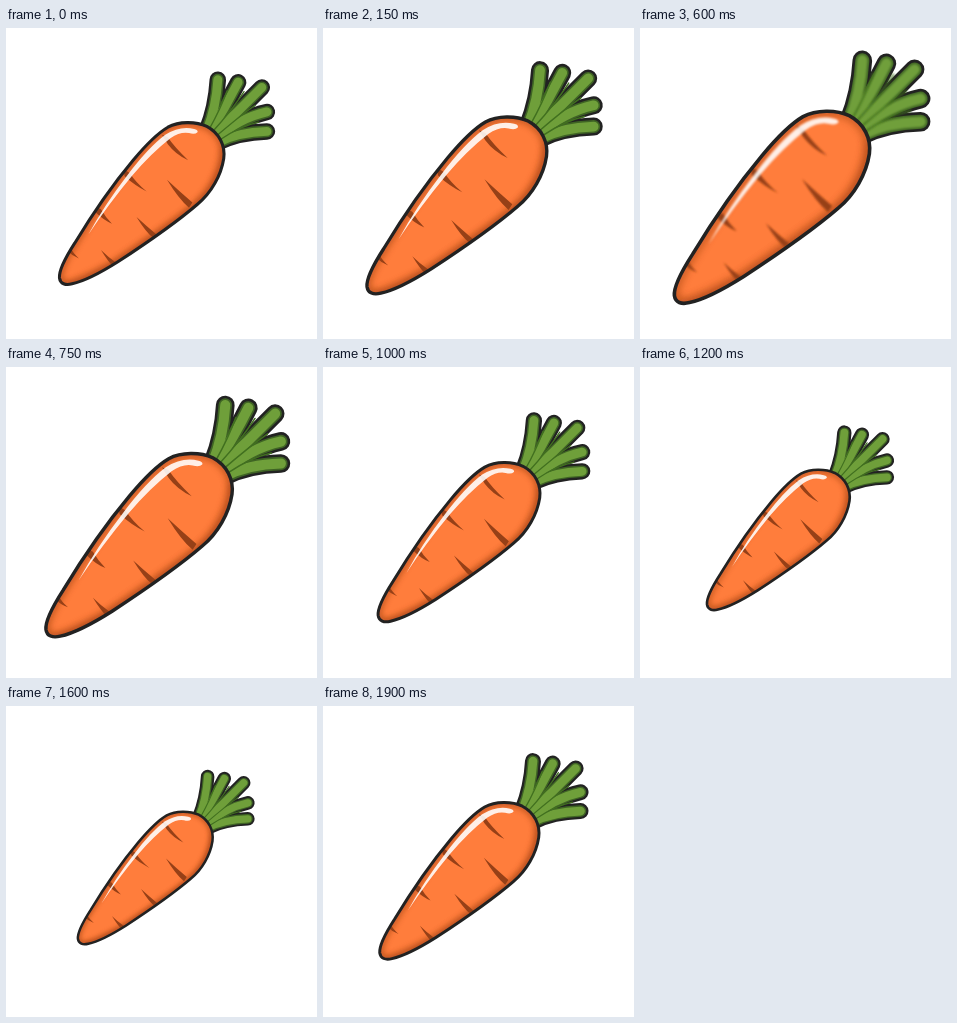
These frames come from a looping animation (311x311 px, 1.95 s). An HTML page:

```html
<!DOCTYPE html>
<html>
<head>
<meta charset="utf-8">
<style>
html, body { margin: 0; width: 100%; height: 100%; overflow: hidden; background: #fff }
svg { display: block; width: 311px; height: 311px }
path { stroke-linecap: round; stroke-linejoin: round }
</style>
</head>
<body>
<svg viewBox="0 0 311 311">
  <defs>
    <path id="body" d="M35 267C34 257 44 240 53 226C73 193 96 159 122 128C137 110 151 96 163 89C176 82 196 82 209 88C224 96 231 111 229 126C226 146 214 167 198 180C176 199 133 229 104 248C85 260 64 271 50 274C42 276 36 274 35 267Z"/>
    <clipPath id="inside"><use href="#body"/></clipPath>
    <g id="leaves" fill="none">
      <path d="M209 93Q220 66 222 33"/>
      <path d="M212 96Q231 66 246 36"/>
      <path d="M215 99Q245 72 274 42"/>
      <path d="M219 103Q248 78 280 71"/>
      <path d="M222 107Q246 95 280 94"/>
    </g>
    <filter id="soft" x="-20%" y="-20%" width="140%" height="140%"><feGaussianBlur stdDeviation=".8"/></filter>
    <filter id="shade" x="-20%" y="-20%" width="140%" height="140%"><feGaussianBlur stdDeviation="4"/></filter>
  </defs>
  <g id="carrot">
    <use href="#leaves" stroke="#222" stroke-width="19.5"/>
    <use href="#leaves" stroke="#3f6424" stroke-width="14"/>
    <use href="#leaves" stroke="#6f9f3a" stroke-width="10.5" filter="url(#soft)"/>
    <path d="M212 91Q225 68 233 46M216 94Q238 70 253 47M222 98Q245 78 266 63M226 103Q248 88 270 83" fill="none" stroke="#41701f" stroke-width="1.6" filter="url(#soft)"/>
    <use href="#body" fill="#ff7d3c"/>
    <g clip-path="url(#inside)">
      <use href="#body" fill="none" stroke="#8a3410" stroke-width="7" opacity=".6" filter="url(#shade)"/>
      <path d="M231 118C228 150 207 178 190 191L104 252L45 280" fill="none" stroke="#a84318" stroke-width="12" opacity=".5" filter="url(#shade)"/>
      <g fill="#964017" filter="url(#soft)">
        <path d="M156 98L163 101Q171 113 187 128Q172 121 163 109Z"/>
        <path d="M162 151Q176 164 192 178L188 184Q176 174 162 151Z"/>
        <path d="M110 138L118 143Q125 154 138 165Q124 158 112 147Z"/>
        <path d="M126 195Q137 205 150 216L146 220Q137 213 126 195Z"/>
        <path d="M76 182L84 186Q89 195 97 203Q87 199 77 189Z"/>
        <path d="M84 234Q92 242 102 249L98 253Q92 247 84 234Z"/>
        <path d="M44 230L49 233Q51 238 58 244Q50 241 44 235Z"/>
      </g>
      <path d="M198 95Q195 98 188 96Q178 94 166 102Q143 120 121 146Q92 181 69 216Q88 181 115 146Q140 113 160 98Q177 87 194 91Q199 92 198 95Z" fill="#fff" opacity=".88" filter="url(#soft)"/>
    </g>
    <use href="#body" fill="none" stroke="#222" stroke-width="3.6"/>
  </g>
</svg>
<script>
const carrot = document.getElementById('carrot');
const period = 1950, step = 50, center = 155.5, drawnScale = 1.181;

function draw(now) {
  const t = Math.floor(now % period / step) * step;
  const scale = (1 + 0.2 * Math.sin(2 * Math.PI * t / period)) / drawnScale;
  carrot.setAttribute('transform',
    `translate(${center} ${center}) scale(${scale}) translate(${-center} ${-center})`);
}

const start = performance.now();
function loop() {
  draw(performance.now() - start);
  requestAnimationFrame(loop);
}
loop();
</script>
</body>
</html>
```
